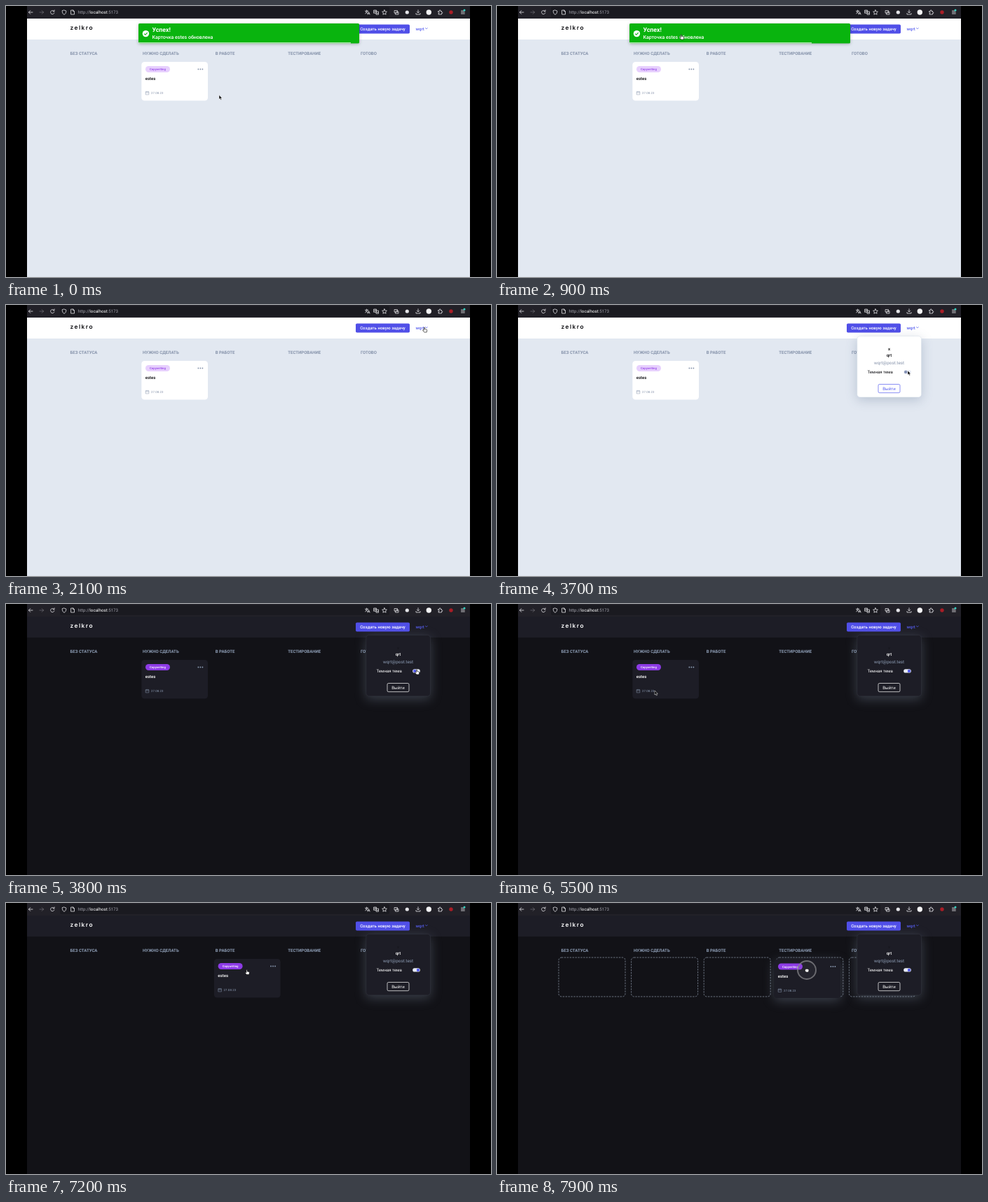
An HTML page for the animation above (8 s loop, 692 by 388 pixels).

```html
<!DOCTYPE html>
<html lang="ru">
<head>
<meta charset="utf-8">
<title>Kanban board</title>
<style>
  html, body { margin: 0; width: 100%; height: 100%; overflow: hidden; background: #000; }
  svg {
    display: block; width: 692px; height: 388px;
    font: 500 6.05px Roboto, "Open Sans", sans-serif; text-rendering: geometricPrecision;
    --page: #e2e8f1; --panel: #fff; --ink: #0b0b0f; --muted: #8592aa; --line: #d5dce7;
    --tag: #e7d0fd; --tagInk: #9340e8; --exit: #565eef; --shadow: rgba(26,56,101,.21);
  }
  svg.dark {
    --page: #121217; --panel: #1d1d26; --ink: #fff; --muted: #8f9fb7; --line: #363843;
    --tag: #8d3be6; --tagInk: #fff; --exit: #fff; --shadow: rgba(148,166,190,.3);
  }
  .page { fill: var(--page); }
  .panel { fill: var(--panel); }
  .ink { fill: var(--ink); }
  .muted { fill: var(--muted); }
  .mid { text-anchor: middle; }
  .title { font-weight: 700; fill: var(--muted); }
  .small { font-size: 4.3px; }
  .slot { fill: none; stroke: #747d8c; stroke-width: .9; stroke-dasharray: 2.4 1.5; }
  .lift { filter: drop-shadow(0 4px 8px var(--shadow)); }
  .icon { fill: none; stroke: #e4e4e8; stroke-width: .8; stroke-linecap: round; stroke-linejoin: round; }
</style>
</head>
<body>
<svg id="stage" viewBox="0 0 692 388">
  <rect width="692" height="388"/>
  <rect class="page" x="30" y="18" width="632" height="370"/>
  <rect class="panel" x="30" y="18" width="632" height="30"/>
  <text class="ink" x="91.5" y="34" style="font:600 8.3px Inter,sans-serif;letter-spacing:1.5px">zelkro</text>
  <rect x="499" y="26.5" width="77" height="13" rx="1.8" fill="#504fe8"/>
  <text class="mid" x="537.5" y="35.2" fill="#fff">Создать новую задачу</text>
  <text x="584.5" y="35" fill="#565eef">wqrt</text>
  <path d="M598.3 31.2l1.6 1.6 1.6-1.6" fill="none" stroke="#565eef" stroke-width=".8"/>

  <g id="columns"></g>
  <g id="slots"></g>

  <g id="card">
    <rect id="cardBox" class="panel" x="193.3" y="80" width="94.7" height="55.5" rx="4.3"/>
    <rect x="199" y="86" width="35" height="9" rx="4.5" fill="var(--tag)"/>
    <text class="small mid" x="216.5" y="92" fill="var(--tagInk)">Copywriting</text>
    <g class="muted">
      <circle cx="274.4" cy="90.5" r=".9"/><circle cx="277.4" cy="90.5" r=".9"/><circle cx="280.4" cy="90.5" r=".9"/>
    </g>
    <text class="ink" x="198.7" y="106">estes</text>
    <path d="M199.2 122.7h4.6v4.2h-4.6zM199.2 124h4.6M200.4 121.9v.8M202.6 121.9v.8" fill="none" stroke="var(--muted)" stroke-width=".5"/>
    <text class="small muted" x="207" y="126.4" style="font-weight:400;letter-spacing:.1px">27.08.23</text>
  </g>

  <g id="menu">
    <rect class="panel lift" x="513.8" y="44.5" width="91.7" height="87.5" rx="4.3" stroke="var(--line)" stroke-width=".5"/>
    <text id="close" class="mid" x="559.5" y="65">x</text>
    <text class="ink mid" x="559.5" y="74">qrt</text>
    <text class="muted mid" x="559.5" y="84.6" style="font-weight:400;font-size:6.3px">wqrt@post.test</text>
    <text class="ink" x="528.5" y="98" style="font-weight:400">Темная тема</text>
    <rect x="580.2" y="93.2" width="10.6" height="5.4" rx="2.7" fill="#e8ecf5"/>
    <circle id="knob" cy="95.9" r="2.2"/>
    <rect x="544" y="113.5" width="31" height="12.2" rx="1.8" fill="none" stroke="var(--exit)" stroke-width=".7"/>
    <text class="mid" x="559.5" y="121.7" fill="var(--exit)" style="font-weight:400">Выйти</text>
  </g>

  <g id="toast">
    <rect x="189" y="25" width="315" height="28.6" rx="1.6" fill="#09b40e" style="filter:drop-shadow(0 1px 2px rgba(0,0,0,.28))"/>
    <rect id="bar" x="189" y="52" height="1.6" fill="#fff" opacity=".65"/>
    <circle cx="199.4" cy="39.6" r="4.7" fill="#fff"/>
    <path d="M197.2 39.7l1.6 1.6 2.9-3.2" fill="none" stroke="#09b40e" stroke-width="1.1"/>
    <g fill="#fff">
      <text x="208.4" y="37" style="font-weight:700;font-size:8.8px">Успех!</text>
      <text x="208.4" y="46.9" style="font-size:7px">Карточка estes обновлена</text>
    </g>
  </g>

  <rect x="30" width="632" height="18" fill="#222128"/>
  <rect x="77" y="1.5" width="470" height="14.5" rx="2" fill="#1a1a20"/>
  <text x="102.5" y="11.3" fill="#a2a2ab" style="font-weight:400;font-size:6.2px">http://<tspan fill="#fff">localhost</tspan>:5173</text>
  <g class="icon">
    <path d="M38 9h-5.6m2.3-2.4L32.400 9l2.300 2.400"/>
    <path d="M48 9h5.500m-2.300-2.400L53.500 9l-2.300 2.400" opacity=".35"/>
    <path d="M68.600 7.600a2.700 2.700 0 1 0 .3 2.200M69 5.800v2h-2"/>
    <path d="M83 6l2.800 1c0 2.800-.8 4.300-2.800 5.300c-2-1-2.800-2.500-2.800-5.300z"/>
    <path d="M93 6h2.800l1.700 1.700v4.300H93zM95.700 6v1.800h1.700"/>
    <path d="M512.500 7.200h4M514.500 6v1.200M516 7.200q-.8 2.500-3.300 3.600M513.300 8.200q.8 1.600 2.300 2.200M516 12l1.500-3.500 1.500 3.500M516.500 11h2"/>
    <path d="M525 6h3.500v4.200H525zM526 7.300h1.500M526 8.700h1M528.500 8h3v4.200h-3.500v-2M529.500 10.500h1"/>
    <path d="M540 5.700l1 2.200 2.400.3-1.800 1.600.5 2.400-2.100-1.200-2.100 1.200.5-2.400-1.800-1.600 2.400-.3z"/>
    <path d="M554.500 6.500h4v3.500h-4zM556.500 8.500h3.500v3.500h-4.500v-2"/>
    <path d="M588 5.700v4m-1.700-1.600l1.700 1.700 1.700-1.700M585 10.500v1.500h6v-1.500"/>
    <path d="M617 7.500h1.400q-.5-1.700.8-1.700t.8 1.700h1.500v1.400q1.300-.3 1.300.8t-1.300.8v1.500H617v-1.500q1.200 0 1.200-.8t-1.200-.8z"/>
    <path d="M649.500 7h4M649.500 9h4.800M649.500 11h4.800"/>
  </g>
  <circle cx="572.300" cy="9" r="2.600" fill="#e4e4e8"/>
  <circle cx="603.300" cy="9" r="3.700" fill="#f4f4f6"/>
  <circle cx="635" cy="9" r="2.700" fill="#a91d26"/>
  <circle cx="654" cy="6" r="1.500" fill="#35d6c4"/>

  <circle id="ring" r="13" fill="#888" fill-opacity=".08" stroke="#85858a" stroke-opacity=".75" stroke-width="1.900"/>
  <g id="pointer" stroke-linejoin="round">
    <path id="arrow" d="M0 0v6l1.400-1.200 1 2.200 1.100-.5-1-2.100h1.800z" fill="#000" stroke="#fff" stroke-width=".5"/>
    <path id="hand" d="M-.7.3q.7-.8 1.300 0v2.200l2.400.5q.8.300.7 1.200l-.5 2.800h-3.400l-2.200-2.600q0-.9.900-.7l.8.600z" fill="#fff" stroke="#000" stroke-width=".6"/>
    <path id="fist" d="M-2.300-.2q.6-1.700 1.600-1.200q.8-.8 1.500 0q1-.4 1.300.4q.9 0 .9 1l-.7 3h-3.200l-1.600-1.800z" fill="#fff" stroke="#000" stroke-width=".5"/>
  </g>
</svg>
<script>
const $ = id => document.getElementById(id);
const show = (id, on) => $(id).style.display = on ? '' : 'none';
const move = (id, x, y) => $(id).setAttribute('transform', `translate(${x} ${y})`);
const within = (t, ...spans) => spans.some(([a, b]) => t >= a && t < b);
const PITCH = 103.6;

['БЕЗ СТАТУСА', 'НУЖНО СДЕЛАТЬ', 'В РАБОТЕ', 'ТЕСТИРОВАНИЕ', 'ГОТОВО'].forEach((name, i) => {
  const dx = i * PITCH;
  $('columns').innerHTML += `<text class="title" x="${91.5 + dx}" y="70.2">${name}</text>`;
  $('slots').innerHTML += `<rect class="slot" x="${88 + dx}" y="78" width="95" height="56" rx="4"/>`;
});

// Rows are [time, x, y]; motion eases between neighbouring rows.
const path = [
  [150, 304, 127.5], [900, 263, 41], [1250, 263, 41], [1700, 560, 38], [1800, 560, 38],
  [2100, 597, 32], [2300, 595, 32], [2950, 595, 32], [3600, 586, 94], [4950, 586, 94],
  [5500, 225, 124], [5800, 235.5, 92], [6080, 235.5, 92], [6400, 326, 99], [6700, 345, 95],
  [6850, 345, 95], [7100, 343.6, 95.5], [7300, 343.6, 95.5], [7800, 437, 97], [7900, 442, 96]
];
const toastPath = [[1050, 0, 0], [1200, 0, -6], [1350, 0, 8], [1390, 0, 8], [1490, 0, -45]];

function at(rows, t) {
  const i = rows.findIndex(r => r[0] > t);
  if (i < 1) return (i ? rows[rows.length - 1] : rows[0]).slice(1);
  const [a, b] = [rows[i - 1], rows[i]];
  const u = (t - a[0]) / (b[0] - a[0]), k = u * u * (3 - 2 * u);
  return [1, 2].map(n => a[n] + (b[n] - a[n]) * k);
}

function draw(t) {
  const [x, y] = at(path, t);
  const dark = t >= 3800;
  const drag = within(t, [6100, 6800], [7300, 8000]);
  const hand = within(t, [700, 1390], [1950, 3050], [3800, 5020], [5700, 6100], [6800, 7300]);
  $('stage').classList.toggle('dark', dark);

  show('toast', t < 1490);
  move('toast', ...at(toastPath, t));
  $('bar').setAttribute('width', 303 - 0.063 * Math.min(t, 683));

  show('menu', t >= 2700);
  $('close').setAttribute('fill', dark ? '#17171e' : '#000');
  $('knob').setAttribute('cx', 583.2 + 4.8 * Math.min(1, Math.max(0, (t - 3800) / 300)));
  $('knob').setAttribute('fill', dark ? '#565eef' : '#8592b5');

  show('slots', drag);
  $('cardBox').classList.toggle('lift', drag);
  if (drag) move('card', x - (t < 7000 ? 235.5 : 240), y - (t < 7000 ? 92 : 95.5));
  else move('card', t < 6100 ? 0 : PITCH, 0);

  show('ring', drag || within(t, [1000, 1100], [2500, 2700]));
  move('ring', x, y);
  move('pointer', x, y);
  show('fist', drag);
  show('hand', hand);
  show('arrow', !drag && !hand);
}

const start = performance.now();
function tick() {
  draw((performance.now() - start) % 8000);
  requestAnimationFrame(tick);
}
tick();
</script>
</body>
</html>
```
